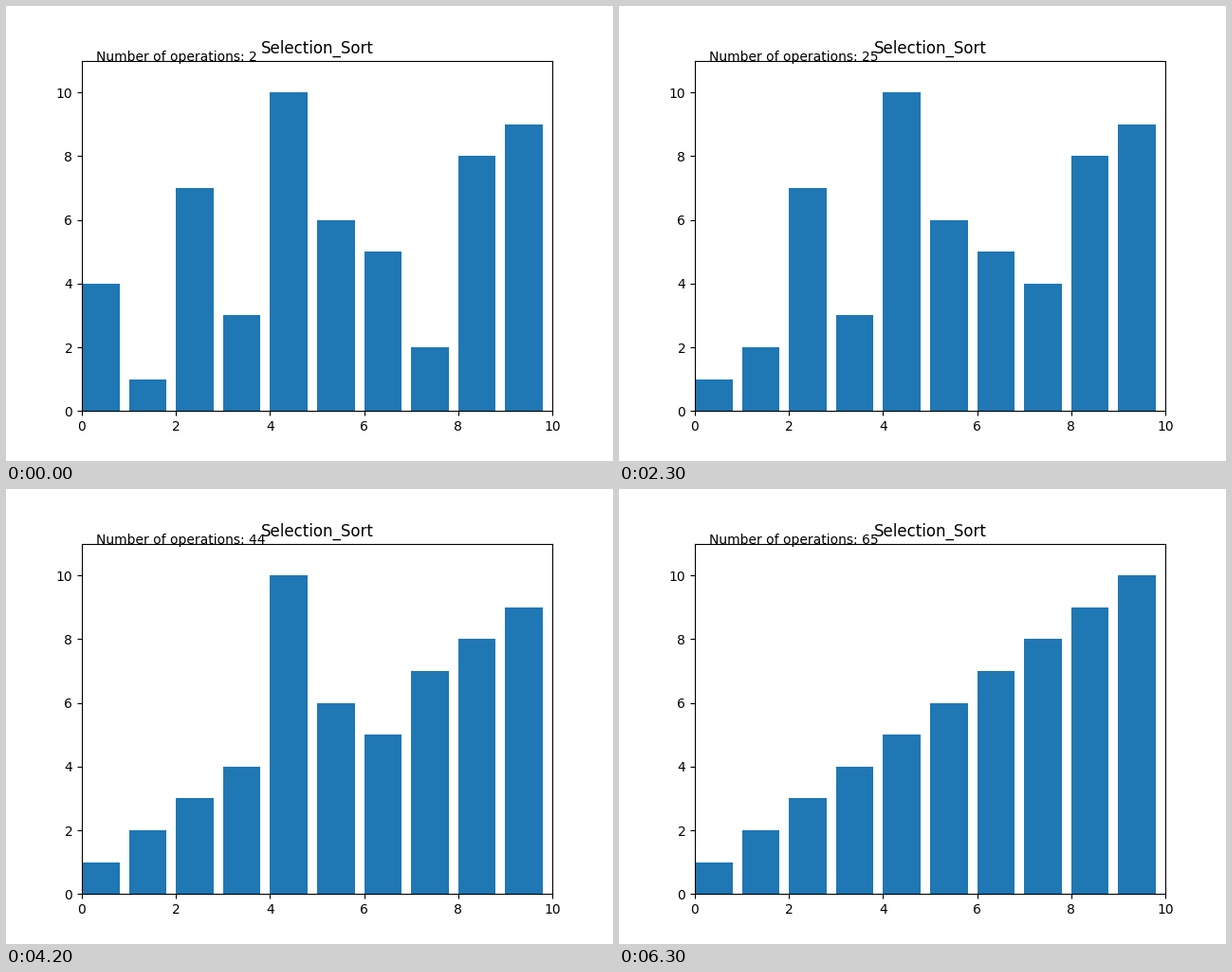
Write a matplotlib script that moves like this. It is 640 px wide and 480 px high and loops after 6.4 s.

```python
import matplotlib.pyplot as plt
from matplotlib.animation import FuncAnimation

START = [4, 1, 7, 3, 10, 6, 5, 2, 8, 9]
FRAMES = 64
INTERVAL = 100


def selection_sort(values):
    """Yield the list after every comparison and for each write of a swap."""
    a = list(values)
    n = len(a)
    for i in range(n - 1):
        low = i
        for j in range(i + 1, n):
            if a[j] < a[low]:
                low = j
            yield list(a)
        a[i], a[low] = a[low], a[i]
        yield list(a)
        yield list(a)
    yield list(a)


steps = list(selection_sort(START))

fig, ax = plt.subplots(figsize=(6.4, 4.8), dpi=100)
ax.set_title("Selection_Sort")
bars = ax.bar(range(len(START)), START, width=0.8, align="edge")
ax.set_xlim(0, 10)
ax.set_ylim(0, 11)
label = ax.text(0.03, 1, "", transform=ax.transAxes)


def update(frame):
    for bar, height in zip(bars, steps[frame]):
        bar.set_height(height)
    label.set_text(f"Number of operations: {frame + 2}")
    return [*bars, label]


anim = FuncAnimation(fig, update, frames=FRAMES, interval=INTERVAL,
                     init_func=lambda: update(0), repeat=True, repeat_delay=0)
plt.show()
```
